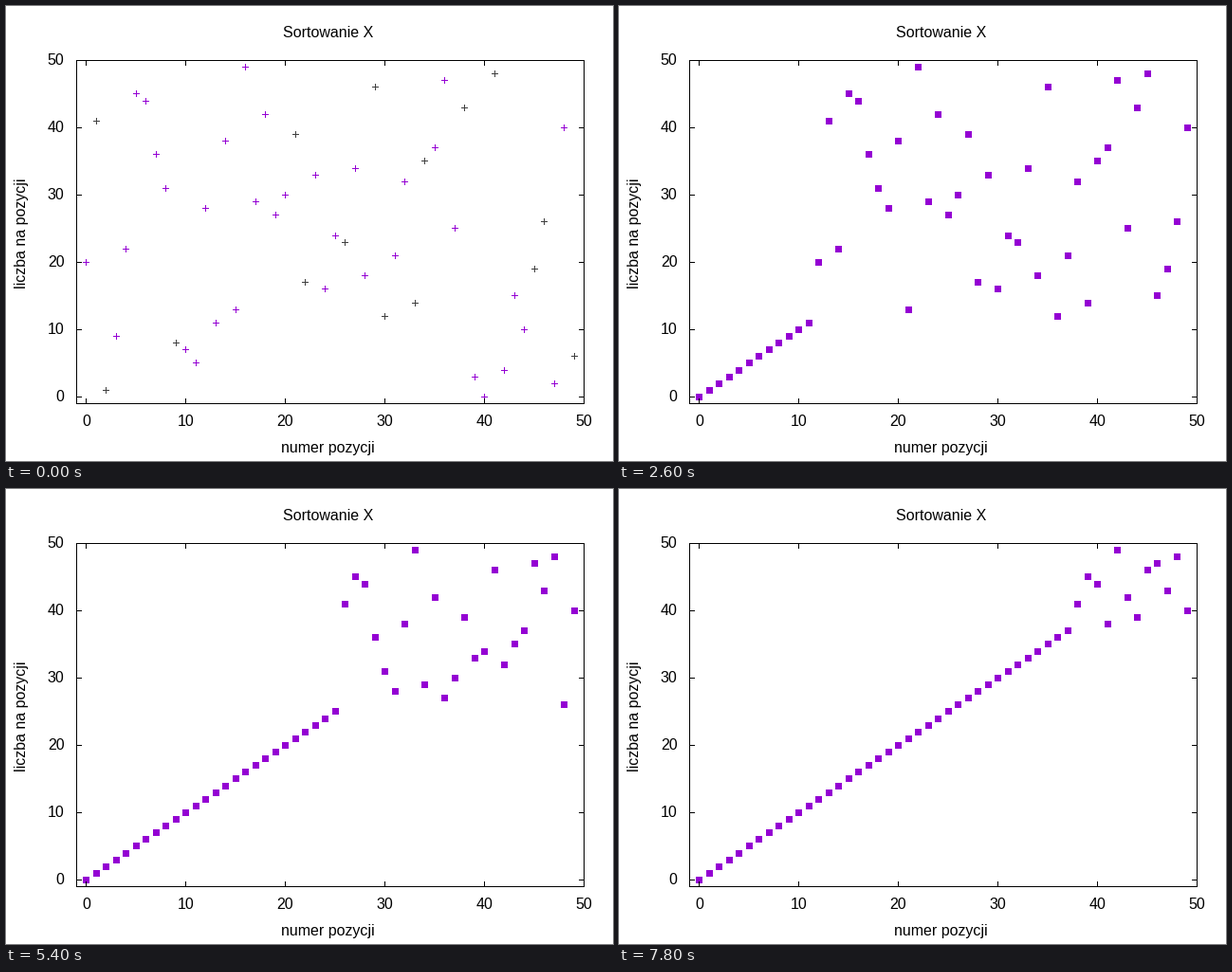
These frames come from a looping animation (640 px wide and 480 px high, 8000 ms). A matplotlib script:

```python
import math

import matplotlib.pyplot as plt
from matplotlib.animation import FuncAnimation
from matplotlib.collections import PolyCollection

W, H, DPI = 640, 480, 100
LEFT, RIGHT, TOP, BOTTOM = 74, 609, 57, 419
LOW, HIGH = -1, 50
TICK = 5
STEP_MS, STEPS = 200, 40
PURPLE, GREY = "#9400d3", "#404040"

START = [20, 41, 1, 9, 22, 45, 44, 36, 31, 8,
         7, 5, 28, 11, 38, 13, 49, 29, 42, 27,
         30, 39, 17, 33, 16, 24, 23, 34, 18, 46,
         12, 21, 32, 14, 35, 37, 47, 25, 43, 3,
         0, 48, 4, 15, 10, 19, 26, 2, 40, 6]
GREY_SPOTS = {1, 2, 9, 21, 22, 26, 29, 30, 33, 34, 38, 41, 45, 46, 49}


def px(x):
    return math.floor(LEFT + (x - LOW) * (RIGHT - LEFT) / (HIGH - LOW) + 0.5)


def py(y):
    return math.floor(BOTTOM - (y - LOW) * (BOTTOM - TOP) / (HIGH - LOW) + 0.5)


def box(x0, y0, x1, y1):
    """Rectangle covering whole pixels x0..x1, y0..y1."""
    return [(x0, y0), (x1 + 1, y0), (x1 + 1, y1 + 1), (x0, y1 + 1)]


def square(x, y):
    return box(x - 3, y - 3, x + 3, y + 3)


def plus(x, y):
    return [box(x - 3, y, x + 3, y), box(x, y - 3, x, y + 3)]


def sorted_part(count):
    """The smallest values moved to the front, the rest in first order."""
    return list(range(count)) + [v for v in START if v >= count]


fig = plt.figure(figsize=(W / DPI, H / DPI), dpi=DPI, facecolor="white")
ax = fig.add_axes([0, 0, 1, 1])
ax.set_xlim(0, W)
ax.set_ylim(H, 0)
ax.axis("off")


def shapes(color, z):
    items = PolyCollection([], facecolors=color, edgecolors="none",
                           linewidths=0, zorder=z)
    items.set_snap(False)
    ax.add_collection(items, autolim=False)
    return items


def label(x, y, text, ha="center", **kw):
    ax.text(x, y, text, ha=ha, va="baseline", family="Liberation Sans",
            size=16 * 72 / DPI, color="black", **kw)


frame_lines = [box(LEFT, TOP, RIGHT, TOP), box(LEFT, BOTTOM, RIGHT, BOTTOM),
               box(LEFT, TOP, LEFT, BOTTOM), box(RIGHT, TOP, RIGHT, BOTTOM)]
for n in range(0, 51, 10):
    x, y = px(n), py(n)
    frame_lines += [box(x, TOP, x, TOP + TICK), box(x, BOTTOM - TICK, x, BOTTOM),
                    box(LEFT, y, LEFT + TICK, y), box(RIGHT - TICK, y, RIGHT, y)]
    label(x + 0.5, 443, str(n))
    label(61.5, y + 5, str(n), ha="right")
shapes("black", 3).set_verts(frame_lines)

label(339.5, 33, "Sortowanie X")
label(339.5, 471, "numer pozycji")
label(21, 239.5, "liczba na pozycji", rotation=90, rotation_mode="anchor")

marks = shapes(PURPLE, 2)


def update(step):
    spots = [(px(i), py(v)) for i, v in enumerate(sorted_part(max(step - 1, 0)))]
    if step == 0:
        marks.set_verts([bar for s in spots for bar in plus(*s)])
        marks.set_facecolor([GREY if i in GREY_SPOTS else PURPLE
                             for i in range(len(spots)) for _ in range(2)])
    else:
        marks.set_verts([square(*s) for s in spots])
        marks.set_facecolor(PURPLE)
    return [marks]


anim = FuncAnimation(fig, update, frames=STEPS, interval=STEP_MS,
                     init_func=lambda: update(0), repeat=True,
                     repeat_delay=0, blit=False)
plt.show()
```
